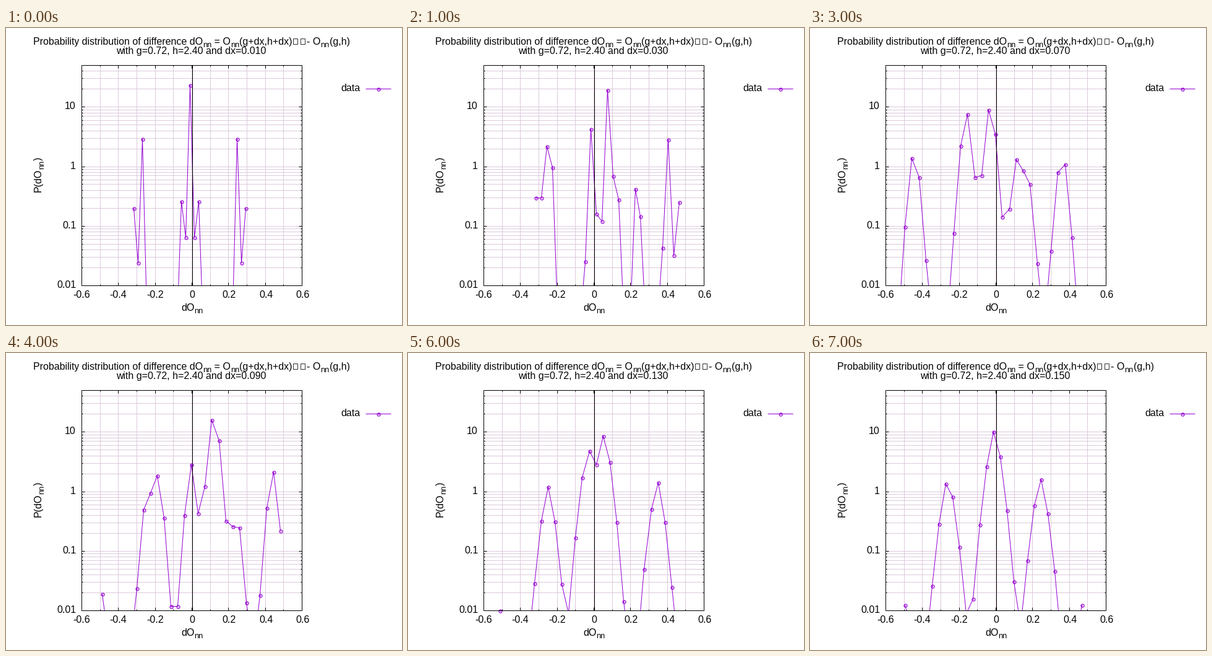
Write a matplotlib script that moves like this. It is 640 px wide and 480 px high and loops after 8000 ms.

```python
import numpy as np
import matplotlib.pyplot as plt
from matplotlib.animation import FuncAnimation
from matplotlib.patches import Rectangle

W, H, DPI = 640, 480, 100
L, R, T, B = 122, 478, 60, 416
PX = 72 / DPI
PURPLE, GRID = "#9400d3", "#dccadc"
BINS = 27

plt.rcParams["font.family"] = "Liberation Sans"
plt.rcParams["text.hinting"] = "native"

fig = plt.figure(figsize=(W / DPI, H / DPI), dpi=DPI, facecolor="white")
ax = fig.add_axes([0, 0, 1, 1])
ax.set_xlim(-0.5, W - 0.5)
ax.set_ylim(H - 0.5, -0.5)
ax.axis("off")


def px(v):
    return np.rint(L + (R - L) * (v + 0.6) / 1.2)


def py(p):
    return np.rint(B - (B - T) * np.log(p / 0.01) / np.log(5000))


def line(xs, ys, color="black", z=1):
    return ax.plot(xs, ys, color=color, lw=PX, snap=False,
                   solid_capstyle="butt", zorder=z)[0]


def box(x, y, w, h, color="black"):
    ax.add_patch(Rectangle((x, y), w, h, fill=False, ec=color, lw=PX,
                           snap=False, joinstyle="miter", zorder=5))


def label(x, base, text, size=16, rotation=0):
    return ax.text(x - 0.5, base - 0.5, text, fontsize=size * PX, ha="left",
                   va="baseline", rotation=rotation, rotation_mode="anchor",
                   zorder=6)


def sub(x, base, rotation=0):
    label(x, base, "nn", 12.8, rotation)


def dots(z):
    ring = ax.plot([], [], "o", ms=5 * PX, mfc="none", mec=PURPLE,
                   mew=1.2 * PX, zorder=z)[0]
    core = ax.plot([], [], "s", ms=PX, mfc=PURPLE, mec="none", zorder=z)[0]
    return ring, core


# Grid, ticks and frame
def grid_x(v, major):
    x, n = px(v), 5 if major else 2
    line([x, x], [T, B], GRID)
    for y, d in ((T, n), (B, -n)):
        line([x, x], [y, y + d], z=5)


def grid_y(p, major):
    y, n = py(p), 5 if major else 2
    line([L, R], [y, y], GRID)
    for x, d in ((L, n), (R, -n)):
        line([x, x + d], [y, y], z=5)


for i in range(-5, 6):
    grid_x(i / 10, i % 2 == 0)
for e in (-2, -1, 0, 1):
    for m in range(1, 10):
        p = m * 10.0 ** e
        if 0.01 < p < 50:
            grid_y(p, m == 1)

line([301, 301], [T - 0.5, B], z=4)
box(L, T, R - L, B - T)

# Tick labels
for i in range(-3, 4):
    half = 4 if i == 0 else 10 if i > 0 else 14
    label(px(i / 5) - half, 436, f"{i / 5:g}")
for x, p in ((95, 10), (104, 1), (91, 0.1), (82, 0.01)):
    label(x, py(p) + 4, f"{p:g}")

# Title, axis names and key
label(44, 27, "Probability distribution of difference dO")
sub(318, 31)
label(332, 27, " = O")
sub(363, 31)
label(377, 27, "(g+dx,h+dx)")
for x in (464, 476):
    box(x, 17, 7, 9, "#333333")
label(486, 27, "- O")
sub(508, 31)
label(523, 27, "(g,h)")
subtitle = label(178, 42, "")

label(283, 457, "dO")
sub(304, 461)
label(57, 265, "P(dO", rotation=90)
sub(61, 228, 90)
label(57, 214, ")", rotation=90)

label(541, 102, "data")
line([581, 622], [98, 98], PURPLE)
for mark in dots(4):
    mark.set_data([601], [98])


def mirror(mid, half):
    """Peaks repeated on both sides of the middle."""
    return [(mid + s * d, h) for d, h in half for s in ((-1, 1) if d else (1,))]


def histogram(first, last, width, peaks):
    """Bin centres and density as a sum of (centre, height) peaks."""
    v = np.linspace(first, last, BINS)
    p = sum(h * np.exp(-(np.abs(v - c) / width) ** 1.5) for c, h in peaks)
    return v, np.maximum(p, 0.002)


# One distribution for each step dx: first bin, last bin, peak width, peaks
CURVES = [
    histogram(-0.316, 0.294, 0.0072, mirror(-0.011, [
        (0, 23), (0.047, 0.26), (0.2605, 3.5), (0.305, 0.2)])),
    histogram(-0.317, 0.465, 0.0112, [
        (-0.302, 1.4), (-0.2445, 7), (-0.012, 5.4), (0.078, 24),
        (0.13, 0.35), (0.236, 1.2), (0.404, 2.9), (0.465, 0.25)]),
    histogram(-0.526, 0.455, 0.022, [
        (-0.507, 1.1), (-0.443, 2.6), (-0.1515, 12.5), (-0.034, 15),
        (0.088, 1.8), (0.149, 1.8), (0.21, 0.6), (0.379, 2.1),
        (0.455, 0.25)]),
    histogram(-0.533, 0.452, 0.024, [
        (-0.445, 2), (-0.162, 9), (-0.03, 12), (0.11, 1.3), (0.165, 1.2),
        (0.36, 1.9)]),
    histogram(-0.488, 0.483, 0.024, [
        (-0.488, 0.019), (-0.2415, 1.2), (-0.1855, 1.9), (-0.0025, 2.8),
        (0.121, 22), (0.24, 0.5), (0.44, 2.4)]),
    histogram(-0.512, 0.459, 0.028, [
        (-0.512, 0.013), (-0.269, 1), (-0.1945, 1.5), (-0.0264, 4.4),
        (0.1043, 13), (0.235, 0.5), (0.418, 1.5)]),
    histogram(-0.512, 0.462, 0.031, [
        (-0.512, 0.01), (-0.25, 1.2), (-0.03, 5), (0.055, 9), (0.345, 1.5)]),
    histogram(-0.4955, 0.4685, 0.033, mirror(-0.0095, [
        (0, 10.6), (0.2525, 1.65), (0.482, 0.013)])),
]

curve = line([], [], PURPLE, z=3)
curve.set_clip_path(Rectangle((L, T), R - L, B - T + 0.5,
                              transform=ax.transData))
marks = dots(4)


def draw(i):
    v, p = CURVES[i]
    xs, ys = px(v), py(p)
    step = f"{0.01 + 0.02 * i:.3f}"
    subtitle.set_text(f"with g=0.72, h=2.40 and dx={step}")
    # The kerned "11" makes the centred line a little shorter
    subtitle.set_x(177.5 + ("11" in step))
    curve.set_data(xs, ys)
    seen = ys <= B
    for mark in marks:
        mark.set_data(xs[seen], ys[seen])
    return (curve, subtitle, *marks)


anim = FuncAnimation(fig, draw, frames=len(CURVES), interval=1000,
                     repeat=True, repeat_delay=0)
plt.show()
```
